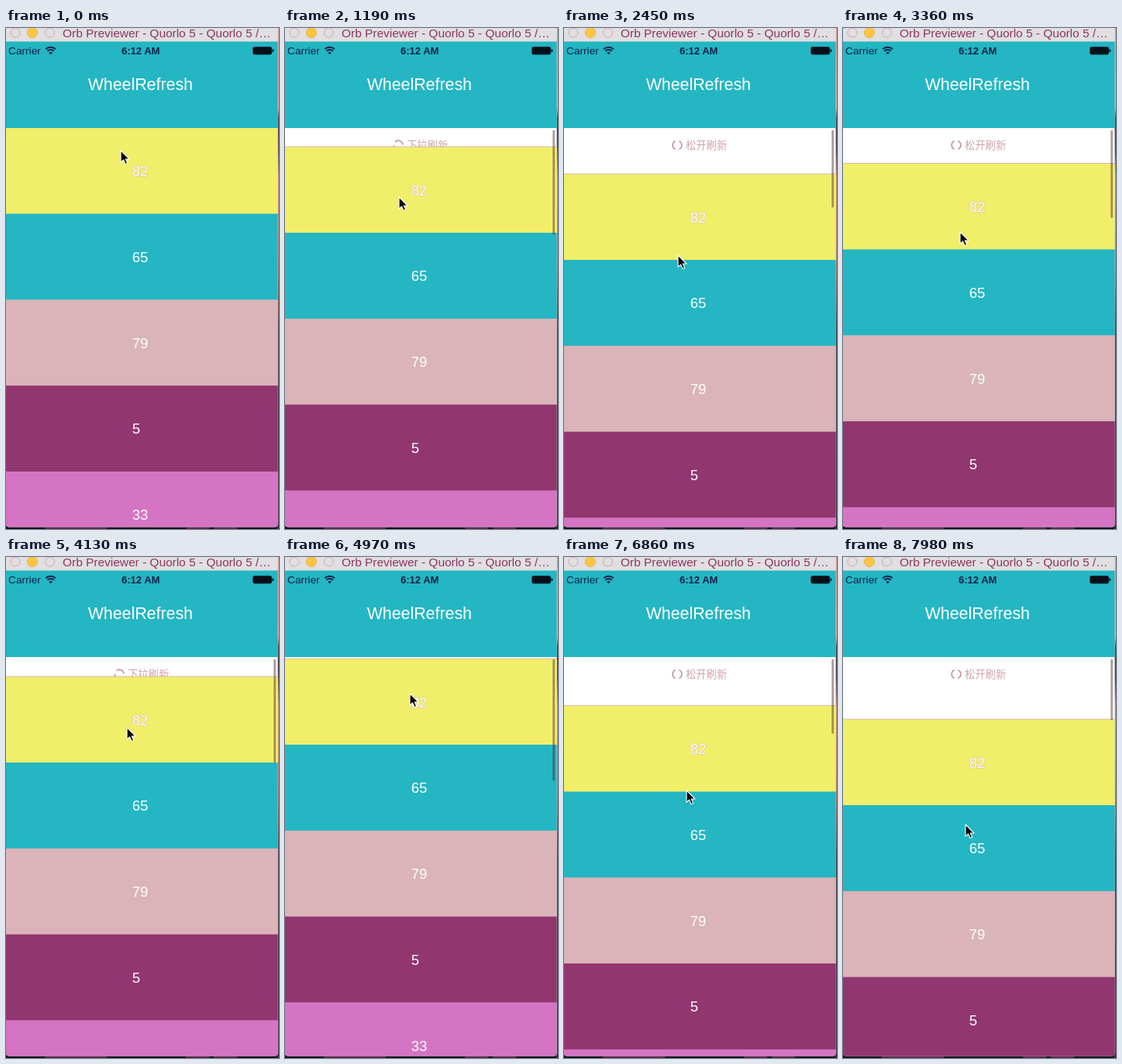
An HTML page for the animation above (8 s loop, 352 by 646 pixels).

```html
<!DOCTYPE html>
<html lang="en">
<head>
<meta charset="utf-8">
<title>WheelRefresh</title>
<style>
  html, body { margin: 0; width: 100%; height: 100%; overflow: hidden; background: #15141a; }
  svg { position: fixed; left: 0; top: 0; display: block; }
  text { font-family: "Liberation Sans", Arial, sans-serif; white-space: pre; }
  .num { font-size: 18.5px; fill: #fff; }
  .hint { font: 400 13.3px "Noto Sans CJK SC", "Noto Sans CJK", sans-serif; fill: #cfa3a8; }
</style>
</head>
<body>
<svg width="352" height="646" viewBox="0 0 352 646">
  <defs>
    <linearGradient id="edge" x2="0" y2="1">
      <stop offset="0" stop-color="#c98a80"/>
      <stop offset=".16" stop-color="#d59a8e"/>
      <stop offset=".18" stop-color="#3a2c33"/>
      <stop offset=".24" stop-color="#4a3a40"/>
      <stop offset=".3" stop-color="#b58476"/>
      <stop offset=".48" stop-color="#a06a5c"/>
      <stop offset=".6" stop-color="#3c3440"/>
      <stop offset="1" stop-color="#35303c"/>
    </linearGradient>
    <clipPath id="win"><path d="M0 0H350.5V639.5a4 4 0 0 1 -4 4H4a4 4 0 0 1 -4 -4Z"/></clipPath>
  </defs>

  <rect width="352" height="646" fill="#15141a"/>
  <rect x="349" width="3" height="646" fill="url(#edge)"/>
  <path d="M50 645H130M232 645H262M268 645H298" stroke="#5c2c52" stroke-width="2"/>

  <g clip-path="url(#win)">
    <rect width="352" height="646" fill="#fff"/>
    <g id="wheel" fill="none" stroke="#c0969b" stroke-width="1.7">
      <path d="M2.4 -5.3A5.8 5.8 0 0 1 2.4 5.3M-2.4 5.3A5.8 5.8 0 0 1 -2.4 -5.3"/>
    </g>
    <text id="hint" class="hint" x="157" y="156"></text>
    <g id="rows"></g>
    <rect id="bar" x="345" y="131.5" width="3" rx="1.5" fill="#3c141e" opacity=".4"/>

    <rect y="17" width="352" height="112" fill="#24b6c3"/>
    <rect width="352" height="17.5" fill="#e0dfe1"/>
    <g stroke="#d8a5a9" fill="none">
      <circle cx="12" cy="6" r="6"/>
      <circle cx="34" cy="6" r="6.5" fill="#ffc540" stroke="#eab04a"/>
      <circle cx="56.500" cy="6" r="6"/>
    </g>
    <text x="73" y="11.500" font-size="15.450" fill="#8c3560">Orb Previewer - Quorlo 5 - Quorlo 5 /…</text>

    <g fill="#0b2148">
      <text x="3" y="34" font-size="13.700">Carrier</text>
      <text x="149" y="34" font-size="13" font-weight="700">6:12 AM</text>
      <path d="M55.400 31.900A3.200 3.200 0 0 1 59.800 31.900L57.600 34.300Z"/>
      <path d="M53.500 29.700A5.900 5.900 0 0 1 61.700 29.700M51.300 27.200A9 9 0 0 1 63.900 27.200" fill="none" stroke="#0b2148" stroke-width="2"/>
    </g>
    <rect x="318.500" y="24.500" width="24" height="9.500" rx="2" fill="#061018" stroke="#0b2f45"/>
    <path d="M344 27.500q1.800 1.700 0 3.500Z" fill="#061018" stroke="#061018"/>
    <text x="105.700" y="80.300" font-size="21.350" fill="#fff">WheelRefresh</text>
  </g>

  <path id="arrow" d="M0 0V15.200L3.500 12L6 17.600L8.600 16.500L6.200 11H11Z" fill="#050505" stroke="#fff" stroke-width="1.100" stroke-linejoin="round"/>
</svg>

<script>
const LOOP = 8000, HOLD = 350, STEP = 70;
const TOP = 128.7, ROW_H = 110.8, GRAB = 171, VIEW = 515, READY = 40;
const ROWS = [["82", "#f1ee6a"], ["65", "#24b6c3"], ["79", "#dab4b8"], ["5", "#92366f"], ["33", "#d574c3"]];

// time, pointer x, pointer y
const PATH = [
  [280, 148, 158], [1190, 147, 218], [2450, 147, 293], [4130, 156, 220],
  [4970, 161, 176], [6020, 158, 223], [7000, 158, 310], [7980, 158, 345]
];

const $ = id => document.getElementById(id);

function add(parent, tag, attrs, text) {
  const el = document.createElementNS("http://www.w3.org/2000/svg", tag);
  for (const k in attrs) el.setAttribute(k, attrs[k]);
  if (text) el.textContent = text;
  return parent.appendChild(el);
}

ROWS.forEach(([label, fill], i) => {
  const y = TOP + i * ROW_H;
  add($("rows"), "rect", { x: 0, y, width: 352, height: ROW_H + 0.5, fill });
  const num = add($("rows"), "text", { class: "num", x: 162.7, y: y + 62.3 }, label);
  if (i === 0) {
    num.setAttribute("stroke", "#d3b3a4");
    num.setAttribute("stroke-width", 1);
    num.setAttribute("paint-order", "stroke");
  }
});
const rule = add($("rows"), "rect", { x: 0, y: TOP - 0.5, width: 352, height: 0.8, fill: "#cfa9a6" });

// Monotone cubic through column c of PATH
const chord = (i, c) => (PATH[i + 1][c] - PATH[i][c]) / (PATH[i + 1][0] - PATH[i][0]);

function tangent(i, c) {
  if (i === 0 || i === PATH.length - 1) return 0;
  const a = chord(i - 1, c), b = chord(i, c);
  return a * b <= 0 ? 0 : 2 * a * b / (a + b);
}

function at(t, c) {
  const last = PATH.length - 1;
  if (t <= PATH[0][0]) return PATH[0][c];
  if (t >= PATH[last][0]) return PATH[last][c];
  let i = 0;
  while (t > PATH[i + 1][0]) i++;
  const h = PATH[i + 1][0] - PATH[i][0], u = (t - PATH[i][0]) / h, v = 1 - u;
  return PATH[i][c] * v * v * (1 + 2 * u) + PATH[i + 1][c] * u * u * (3 - 2 * u)
    + h * u * v * (tangent(i, c) * v - tangent(i + 1, c) * u);
}

// Rubber-band resistance of the list
const pull = y => VIEW * (1 - 1 / (Math.max(0, y - GRAB) * 0.55 / VIEW + 1));

function draw(t) {
  const q = t < HOLD ? 0 : HOLD + Math.floor((t - HOLD) / STEP) * STEP;
  const x = at(q, 1), y = at(q, 2);
  const off = Math.round(pull(y) * 2) / 2;
  $("arrow").setAttribute("transform", `translate(${Math.round(x)} ${Math.round(y)})`);
  $("rows").setAttribute("transform", `translate(0 ${off})`);
  rule.setAttribute("visibility", off > 0 ? "visible" : "hidden");
  $("bar").setAttribute("visibility", off > 0 ? "visible" : "hidden");
  $("bar").setAttribute("height", 159.5 - off);
  $("hint").textContent = off < READY ? "下拉刷新" : "松开刷新";
  $("wheel").setAttribute("transform", `translate(146 151) rotate(${Math.min(1, off / READY) * 180})`);
}

function tick() {
  draw(performance.now() % LOOP);
  requestAnimationFrame(tick);
}
tick();
</script>
</body>
</html>
```
